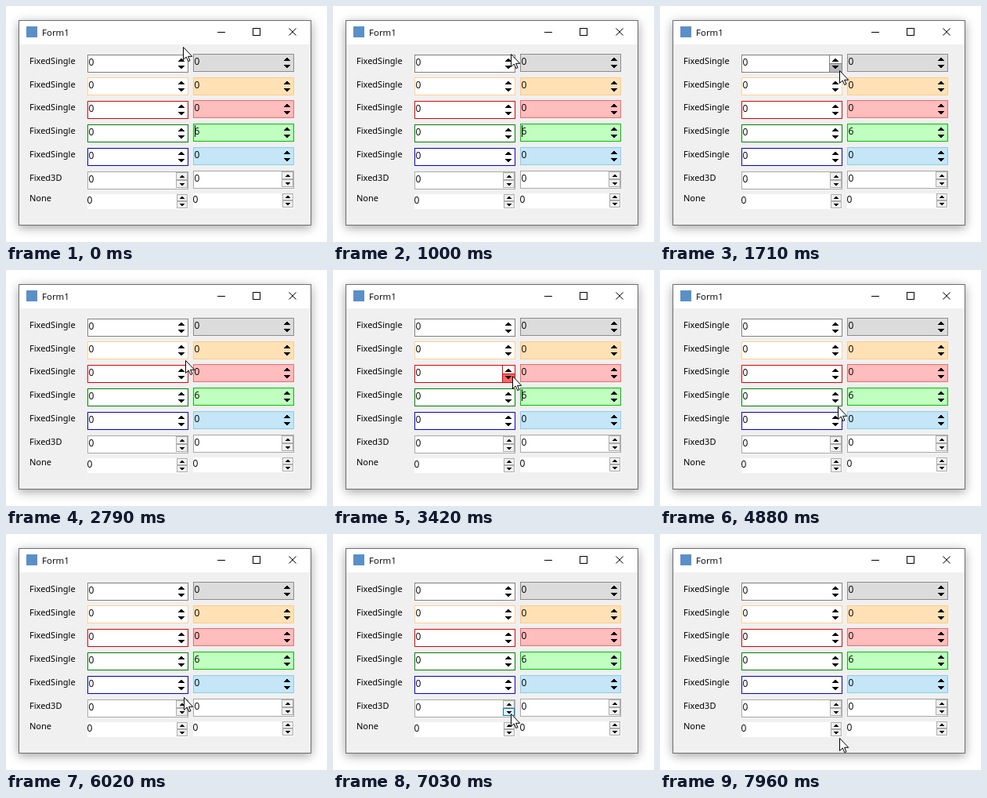
Animation, 410 px wide and 301 px high, one loop 8000 ms. Source, as an HTML page:

```html
<!DOCTYPE html>
<html lang="en">
<head>
<meta charset="utf-8">
<title>Form1</title>
<style>
  html, body { margin: 0; width: 100%; height: 100%; overflow: hidden; background: #fff; }
  svg { position: absolute; left: 0; top: 0; }
  .window {
    position: absolute; left: 16px; top: 18px; width: 372px; height: 260px;
    border: 1px solid #6e6e6e;
    background: linear-gradient(#fff 30px, #f0f0f0 30px);
    box-shadow: 0 3px 12px rgba(0, 0, 0, .36);
  }
  text { font: 12px "Open Sans", sans-serif; }
  .label { font: 11px "Noto Sans", sans-serif; }
  .title { font-size: 11.5px; }
</style>
</head>
<body>
<div class="window"></div>
<svg id="stage" width="410" height="301" shape-rendering="crispEdges">
  <rect x="26" y="26" width="14" height="14" fill="#5b8fc7"/>
  <text class="title" x="46" y="38">Form1</text>
  <g fill="none" stroke="#000">
    <path d="M270 33.5h10M315.5 28.5h9v9h-9z"/>
    <path d="M361.5 28.5l9 9m0-9l-9 9" shape-rendering="auto"/>
  </g>
</svg>
<script>
const stage = document.getElementById('stage');

function add(tag, attrs, parent = stage) {
  const el = document.createElementNS('http://www.w3.org/2000/svg', tag);
  for (const key in attrs) el.setAttribute(key, attrs[key]);
  parent.append(el);
  return el;
}
const rect = (x, y, width, height, fill, parent) =>
  add('rect', { x, y, width, height, fill }, parent);
const frame = (x, y, w, h, fill, stroke, parent) =>
  add('rect', { x: x + .5, y: y + .5, width: w - 1, height: h - 1, fill, stroke }, parent);
const text = (x, y, str, cls = '') => {
  add('text', { x, y, class: cls }).textContent = str;
};

// Stacked 1px bars, narrow end first for "up"
function arrow(cx, y, rows, up) {
  for (let i = 0; i < rows; i++) {
    const half = up ? i + 1 : rows - i;
    rect(cx - half, y + i, half * 2, 1, '#000');
  }
}

const hovers = [];

function addHover(top, mid, bottom, show) {
  hovers.push({ top, mid, bottom, show });
}

function flatBox(x, y, fill, border, value, hot) {
  frame(x, y, 129, 23, fill, border);
  if (hot) {
    const g = add('g', { visibility: 'hidden' });
    rect(x + 112, y + 1, 16, 21, '#fff', g);
    const half = rect(x + 113, y + 1, 15, 10, hot, g);
    rect(x + 112, y + 1, 1, 21, border, g);
    rect(x + 113, y + 11, 15, 1, border, g);
    addHover(y + 1, y + 12, y + 22, part => {
      g.setAttribute('visibility', part ? 'visible' : 'hidden');
      half.setAttribute('y', part === 2 ? y + 12 : y + 1);
    });
  }
  arrow(x + 120, y + 5, 4, true);
  arrow(x + 120, y + 14, 4, false);
  text(x + 1.5, y + 14, value);
}

function spinButtons(x, y, w, h, hover) {
  const parts = [0, 1].map(i => {
    const top = y + i * h;
    const b = frame(x, top, w, h, '#f0f0f0', '#adadad');
    arrow(x + Math.ceil(w / 2), top + Math.floor(h / 2) - 1, 3, !i);
    return b;
  });
  if (!hover) return;
  addHover(y, y + h, y + 2 * h, part => parts.forEach((b, i) => {
    const hot = part === i + 1;
    b.setAttribute('fill', hot ? '#e5f1fb' : '#f0f0f0');
    b.setAttribute('stroke', hot ? '#0078d7' : '#adadad');
  }));
}

// left top, right top, left border, hover, right fill, right border, right value
[
  [62, 61, '#808080', '#b8b8b8', '#dcdcdc', '#8c8c8c', 0],
  [91, 91, '#ffcf90', '#ffb84d', '#ffe1b5', '#ffcb85', 0],
  [121, 120, '#e00000', '#ff6666', '#ffbdbd', '#f06a6a', 0],
  [151, 150, '#008000', '#00e600', '#c0ffc0', '#00c000', 6],
  [181, 180, '#0000c8', '#6a8cff', '#c4e6f6', '#87ceeb', 0]
].forEach(([ly, ry, border, hot, fill, edge, value]) => {
  text(30, ry + 13, 'FixedSingle', 'label');
  flatBox(104, ly, '#fff', border, 0, hot);
  flatBox(239, ry, fill, edge, value);
});

text(30, 223, 'Fixed3D', 'label');
frame(104, 211, 129, 23, '#fff', '#a8a8a8');
frame(239, 210, 129, 23, '#fff', '#a8a8a8');
spinButtons(217, 212, 15, 10, true);
spinButtons(352, 211, 15, 10);
text(105.5, 225, 0);
text(240.5, 224, 0);

text(30, 249, 'None', 'label');
rect(104, 240, 129, 19, '#fff');
rect(239, 239, 129, 19, '#fff');
spinButtons(218, 240, 14, 9, true);
spinButtons(353, 239, 14, 9);
text(103.5, 252, 0);
text(238.5, 251, 0);

const caret = rect(241, 152, 1, 15, '#000');
const cursor = add('path', {
  d: 'M.5.5v16l3.7-3.5 2.6 5.6 2.2-1-2.5-5.3h5.2z',
  fill: '#fff', stroke: '#000', 'shape-rendering': 'auto'
});

// time, x, y of the pointer tip
const path = [
  [0, 226, 52], [622, 226, 52], [1702, 229, 82], [2780, 229, 115],
  [3935, 229, 152], [4012, 229, 154], [4860, 227, 174], [5707, 227, 202],
  [6015, 227, 208], [6478, 227, 222], [6880, 227, 222], [7640, 229, 258],
  [7850, 229, 258], [7950, 229, 260], [8000, 229, 260]
];
const LOOP = 8000, TICK = 77.07, BLINK = 529.2;

function pointAt(t) {
  const i = path.findIndex(p => p[0] > t);
  const [t0, x0, y0] = path[i - 1], [t1, x1, y1] = path[i];
  const k = (t - t0) / (t1 - t0);
  return [Math.round(x0 + (x1 - x0) * k), Math.round(y0 + (y1 - y0) * k)];
}

function draw(now) {
  const t = now % LOOP;
  // The pointer advances in coarse ticks
  const step = Math.max(0, 700 + Math.floor((t - 700) / TICK + .02) * TICK);
  const [x, y] = pointAt(t > 7955 ? 7960 : step);
  cursor.setAttribute('transform', `translate(${x} ${y})`);
  for (const h of hovers) {
    h.show(y < h.top || y >= h.bottom ? 0 : y < h.mid ? 1 : 2);
  }
  const blinks = Math.floor((t - 450) / BLINK);
  caret.setAttribute('visibility', blinks % 2 ? 'visible' : 'hidden');
}

const start = performance.now();
function tick() {
  draw(performance.now() - start);
  requestAnimationFrame(tick);
}
tick();
</script>
</body>
</html>
```
